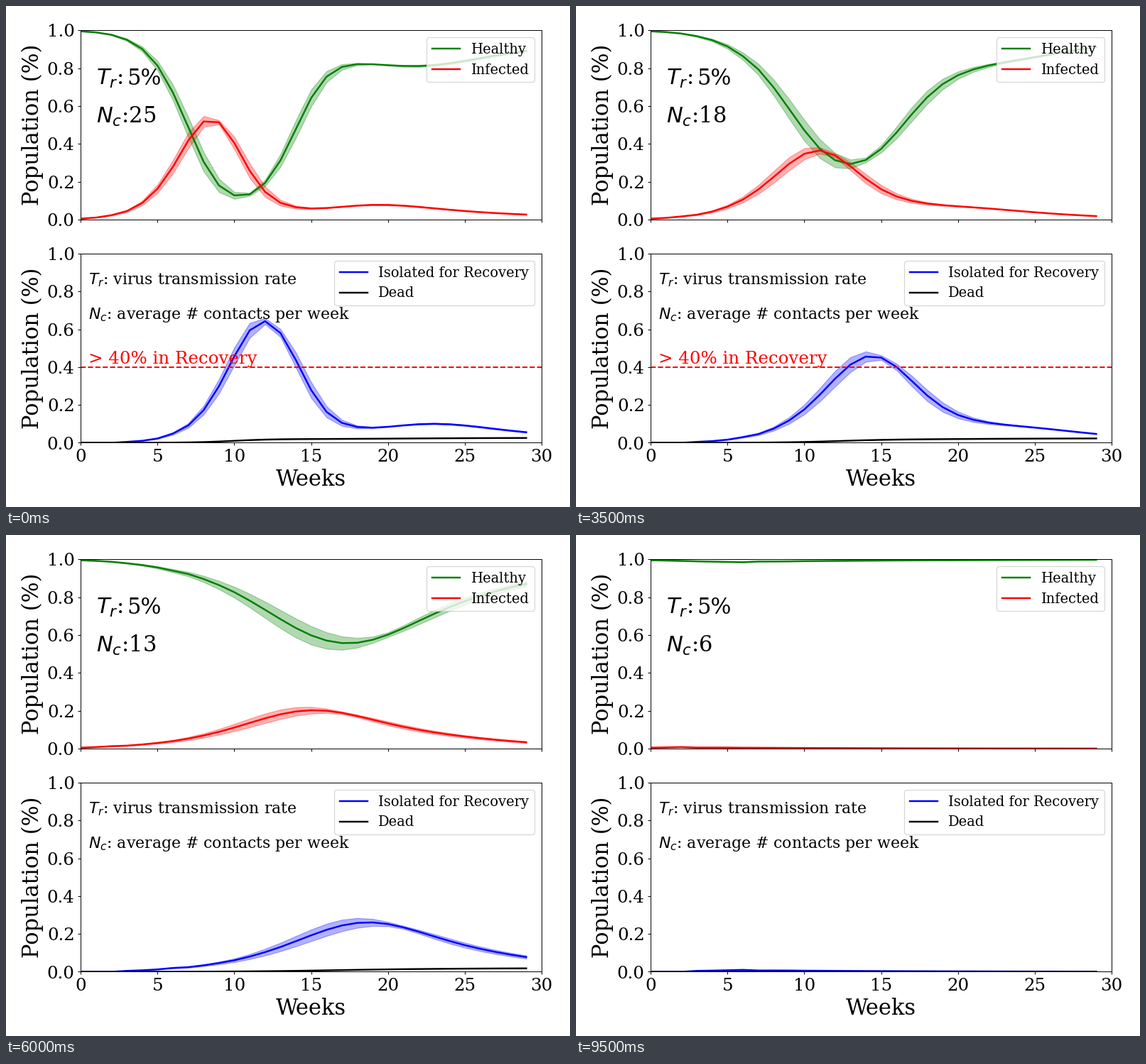
A matplotlib script for the animation above (10 s loop, 794 by 706 pixels).

```python
import numpy as np
import matplotlib.pyplot as plt
from matplotlib.animation import FuncAnimation

W, H, DPI = 794, 706, 88
WEEKS = 30
CONTACTS = list(range(25, 5, -1))
TRANSMISSION = 0.05
EFFECTIVENESS = 0.94
SEED = 0.005
SICK, RECOVERED = 3, 7          # weeks from infection to isolation / release
DEATH_RATE = 0.02
BETA_SPREAD, SEED_SPREAD = 0.035, 0.12

plt.rcParams["font.family"] = "DejaVu Serif"
plt.rcParams["mathtext.fontset"] = "dejavusans"


def lagged(series, lag):
    return np.concatenate([np.zeros(lag), series[:-lag]])


def simulate(beta, seed):
    """Weekly shares of healthy, infected, isolated and dead people."""
    new = np.zeros(WEEKS)
    pool = np.zeros(WEEKS)      # released people, by week of release
    new[0], naive = seed, 1 - seed
    for t in range(1, WEEKS):
        infected = new[max(0, t - SICK):t].sum()
        force = 1 - np.exp(-beta * infected)
        age = t - 1 - np.arange(t)
        again = force * (0.2 + 0.45 * np.exp(-age / 3)) * pool[:t]
        pool[:t] -= again
        new[t] = force * naive + again.sum()
        naive -= force * naive
        if t >= RECOVERED:
            pool[t] = (1 - DEATH_RATE) * new[t - RECOVERED]
    total = np.cumsum(new)
    infected = total - lagged(total, SICK)
    isolated = (1 - DEATH_RATE) * (lagged(total, SICK) - lagged(total, RECOVERED))
    dead = DEATH_RATE * lagged(total, SICK)
    return np.array([1 - infected - isolated - dead, infected, isolated, dead])


def outbreak(contacts):
    """Mean curves and their spread over repeated runs."""
    beta = EFFECTIVENESS * TRANSMISSION * contacts
    by_beta = (simulate(beta * (1 + BETA_SPREAD), SEED)
               - simulate(beta * (1 - BETA_SPREAD), SEED)) / 2
    by_seed = (simulate(beta, SEED * (1 + SEED_SPREAD))
               - simulate(beta, SEED * (1 - SEED_SPREAD))) / 2
    return simulate(beta, SEED), np.hypot(by_beta, by_seed)


fig = plt.figure(figsize=((W + 0.01) / DPI, (H + 0.01) / DPI), dpi=DPI,
                 facecolor="white")


def make_axes(top, bottom):
    left, right = 105.2, 754
    ax = fig.add_axes([left / W, 1 - bottom / H, (right - left) / W, (bottom - top) / H])
    ax.set(xlim=(0, 30), ylim=(0, 1), xticks=range(0, 31, 5))
    ax.set_yticks(np.arange(6) / 5)
    ax.tick_params(labelsize=20)
    ax.set_ylabel("Population (%)", fontsize=25)
    return ax


upper = make_axes(34.3, 301)
lower = make_axes(349, 615.5)
upper.tick_params(labelbottom=False)
lower.set_xlabel("Weeks", fontsize=25)

weeks = np.arange(WEEKS)
SERIES = [(upper, "g", "Healthy"), (upper, "r", "Infected"),
          (lower, "b", "Isolated for Recovery"), (lower, "k", "Dead")]
lines = [ax.plot([], [], color=color, lw=2, label=label)[0]
         for ax, color, label in SERIES]
for ax in (upper, lower):
    ax.legend(loc="upper right", fontsize=16)

upper.text(1, 0.711, "$T_r$:", fontsize=25)
upper.text(3, 0.711, "5%", fontsize=25)
contacts_text = upper.text(1, 0.511, "", fontsize=25)
lower.text(0.5, 0.838, "$T_r$: virus transmission rate", fontsize=18)
lower.text(0.5, 0.654, "$N_c$: average # contacts per week", fontsize=18)
warning = [lower.axhline(0.4, color="r", ls="--", lw=1.6),
           lower.text(0.5, 0.419, "> 40% in Recovery", color="r", fontsize=20)]
bands = []


def update(frame):
    contacts = CONTACTS[frame]
    means, spreads = outbreak(contacts)
    while bands:
        bands.pop().remove()
    for (ax, color, _), line, mean, spread in zip(SERIES, lines, means, spreads):
        line.set_data(weeks, mean)
        if color != "k":
            bands.append(ax.fill_between(weeks, mean - spread, mean + spread,
                                         color=color, alpha=0.3))
    contacts_text.set_text(f"$N_c$:{contacts}")
    for artist in warning:
        artist.set_visible(contacts > 16)
    return lines


anim = FuncAnimation(fig, update, frames=len(CONTACTS), interval=500,
                     init_func=lambda: update(0), repeat=True, repeat_delay=0)
plt.show()
```
